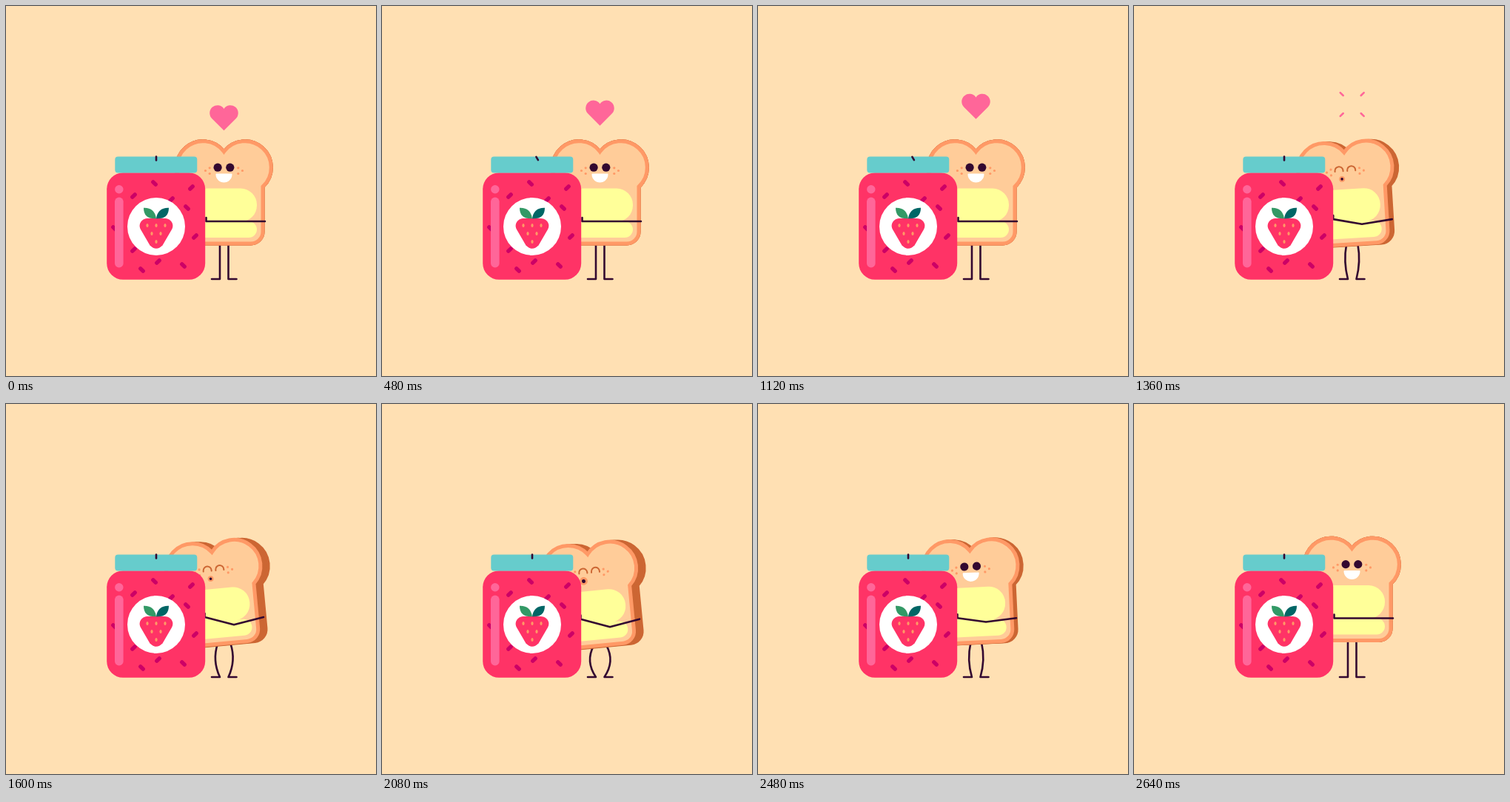
An HTML page that plays this animation: 500x500 px, repeating every 2.72 s.

```html
<!DOCTYPE html>
<html lang="en">
<head>
<meta charset="utf-8">
<title>Toast hugs jam</title>
<style>
html, body { margin: 0; width: 100%; height: 100%; overflow: hidden; background: #ffe0b3; }
svg { display: block; width: 100vw; height: 100vh; }
.line { fill: none; stroke: #330830; stroke-width: 2.6; stroke-linecap: round; stroke-linejoin: round; }
</style>
</head>
<body>
<svg viewBox="0 0 500 500">
  <defs>
    <path id="slice" d="M0-126.7A35.5 35.5 0 1 1 52.5-79.3V-18.5a16 16 0 0 1-16 16h-73a16 16 0 0 1-16-16V-79.3A35.5 35.5 0 1 1 0-126.7Z" stroke-width="5"/>
    <path id="eye" d="M-5.5 3.5v-1a5.5 5.5 0 0 1 11 0v1"/>
    <g id="cheek" fill="#ff9966">
      <circle cx="19.3" cy="-104.7" r="1.6"/><circle cx="25" cy="-101" r="1.6"/><circle cx="19.3" cy="-97" r="1.6"/>
    </g>
    <path id="leaf" d="M0 0Q-17 1-17-14.5Q-2-15 0 0Z"/>
  </defs>

  <path id="heart" fill="#ff6699" d="M0 16.5L-16.1.4A10.5 10.5 0 1 1 0-12.9A10.5 10.5 0 1 1 16.1.4Z"/>
  <path id="burst" fill="none" stroke="#ff6699" stroke-width="2.5" stroke-linecap="round"/>

  <path id="legs" class="line"/>
  <g id="toast">
    <g fill="#cc6633" stroke="#cc6633">
      <use id="sideMid" href="#slice"/><use id="side" href="#slice"/>
    </g>
    <use href="#slice" fill="#ffcc99" stroke="#ff9966"/>
    <g fill="#ffff99">
      <rect x="-44.5" y="-77" width="89" height="45" rx="22"/>
      <rect x="-44.5" y="-32.5" width="89" height="22" rx="11"/>
      <rect x="-44.5" y="-45" width="66" height="24"/>
    </g>
    <use href="#cheek"/><use href="#cheek" transform="scale(-1 1)"/>
    <g id="smile">
      <g fill="#330830"><circle cx="-8.4" cy="-105.3" r="5.6"/><circle cx="8.3" cy="-105.3" r="5.6"/></g>
      <path fill="#fff" d="M-10-97H10q1 0 1 1a11 11 0 0 1-22 0q0-1 1-1Z"/>
    </g>
    <g id="kiss">
      <g fill="none" stroke="#cc6633" stroke-width="2" stroke-linecap="round">
        <use href="#eye" x="-8.4" y="-105"/><use href="#eye" x="8.3" y="-105"/>
      </g>
      <g id="lips"><circle r="3.9" fill="#ff9966"/><circle r="1.8" fill="#330830"/></g>
    </g>
  </g>
  <path id="arms" class="line"/>

  <rect x="136.2" y="225.3" width="133" height="144.5" rx="22" fill="#ff3366"/>
  <g id="bits" stroke="#cc0066" stroke-width="5.4" stroke-linecap="round"></g>
  <g fill="#ff6699">
    <circle cx="152.8" cy="247.7" r="5.7"/><rect x="147" y="258.5" width="11.6" height="95" rx="5.8"/>
  </g>
  <circle cx="203" cy="298" r="39" fill="#fff"/>
  <path fill="#ff3366" d="M192 287H214C223 287 228 295 224 302L211.5 323.5Q203 332 194.5 323.5L182 302C178 295 183 287 192 287Z"/>
  <g id="seeds" fill="#ff9966"></g>
  <use href="#leaf" x="203" y="287.3" fill="#339966"/>
  <use href="#leaf" transform="translate(203 287.3) scale(-1 1)" fill="#006666"/>
  <rect x="147.3" y="203.4" width="111" height="22" rx="4" fill="#66cccc"/>
  <path id="hand" class="line" d="M0-2.2V2.8"/>
</svg>
<script>
const LOOP = 2720, STEP = 80;
const $ = id => document.getElementById(id);
const set = (id, name, value) => $(id).setAttribute(name, value);
const show = (id, on) => set(id, 'visibility', on ? 'visible' : 'hidden');
const ramp = (t, from, to) => Math.min(1, Math.max(0, (t - from) / (to - from)));
const easeOut = u => 1 - (1 - u) ** 3;
const hump = u => Math.sin(Math.PI * u);

// Jam pieces clockwise around the label, slanting alternately
const pieces = '172,256 200,239 250,245 244,272 255,311 239,350 205,345 183,356 172,329 146,300 223,261';
$('bits').innerHTML = pieces.split(' ').map((at, i) => {
  const slant = i % 2 ? 1.7 : -1.7;
  return `<path transform="translate(${at})" d="M-1.2 ${.5 - slant}L2.2 ${.5 + slant}"/>`;
}).join('');

// Strawberry seeds in rows of three, two and one
for (let row = 0; row < 3; row++) {
  for (let i = row; i < 3; i++) {
    $('seeds').innerHTML += `<ellipse cx="${191 + 12 * i - 6 * row}" cy="${296.5 + 11 * row}" rx="1.6" ry="2.6"/>`;
  }
}

function drawHeart(t) {
  const pop = 1 + .5 * Math.exp(-t / 130) * Math.sin(2 * Math.PI * t / 320);
  show('heart', t < 1280);
  set('heart', 'transform', `translate(294.5 ${151.8 - .0138 * t}) scale(${pop * (1 - ramp(t, 1120, 1280))})`);

  const u = ramp(t, 1200, 1440), near = 18 * u, far = 16.6 * easeOut(u);
  show('burst', u > 0 && u < 1);
  set('burst', 'd', [0, 1, 2, 3].map(i => {
    const x = i & 1 ? 1 : -1, y = i & 2 ? 1 : -1;
    return `M${294.7 + near * x} ${133 + near * y}L${294.7 + far * x} ${133 + far * y}`;
  }).join(''));
}

function drawToast(t) {
  const release = ramp(t, 2400, 2560);
  const turn = easeOut(ramp(t, 1200, 1760)) - release;
  const pucker = hump(ramp(t, 1760, 2320)) ** 2;
  const hop = hump(ramp(t, 2440, 2660));
  const sink = 8.5 * (ramp(t, 1240, 2320) - release) - pucker - 5.5 * hop;
  const kissing = t > 1200 && t < 2480;

  set('toast', 'transform', `translate(${294.5 - 4.5 * turn} ${323.5 + sink}) rotate(${-5.5 * turn})`);
  set('side', 'transform', `translate(${10.5 * turn} ${turn})`);
  set('sideMid', 'transform', `translate(${5 * turn} ${turn / 2})`);
  show('smile', !kissing);
  show('kiss', kissing);
  set('lips', 'transform', `translate(${-5 - 4 * pucker} -91) scale(${1 + .4 * pucker})`);

  const armY = 291 + sink, endY = armY - 6 * turn, leftX = 270.5 - 2 * turn;
  set('arms', 'd', `M${leftX} ${endY - 5}V${endY}L308 ${armY + 4.5 * turn}L${350 - 2 * turn} ${endY}`);

  // Knees bow outwards as the body sinks
  const hipY = 321 + sink, midY = (hipY + 369) / 2, bow = 5.4 * Math.sqrt(Math.max(0, sink));
  const leg = (x, side) => `M${x + 3 * turn * side} ${hipY}Q${x + (bow + 1.5 * turn) * side} ${midY} ${x} 369h${11 * side}`;
  set('legs', 'd', leg(289, -1) + leg(300.5, 1));
}

function drawHand(t) {
  const pat = t < 1280 ? hump(t / 320) ** 2 : 0;
  set('hand', 'transform', `translate(${203 + 6.5 * pat} 205.7) rotate(${-30 * pat})`);
}

const start = performance.now();
function tick() {
  const time = (performance.now() - start) % LOOP;
  const t = Math.floor(time / STEP) * STEP;
  drawHeart(t);
  drawToast(t);
  drawHand(t);
  requestAnimationFrame(tick);
}
tick();
</script>
</body>
</html>
```
